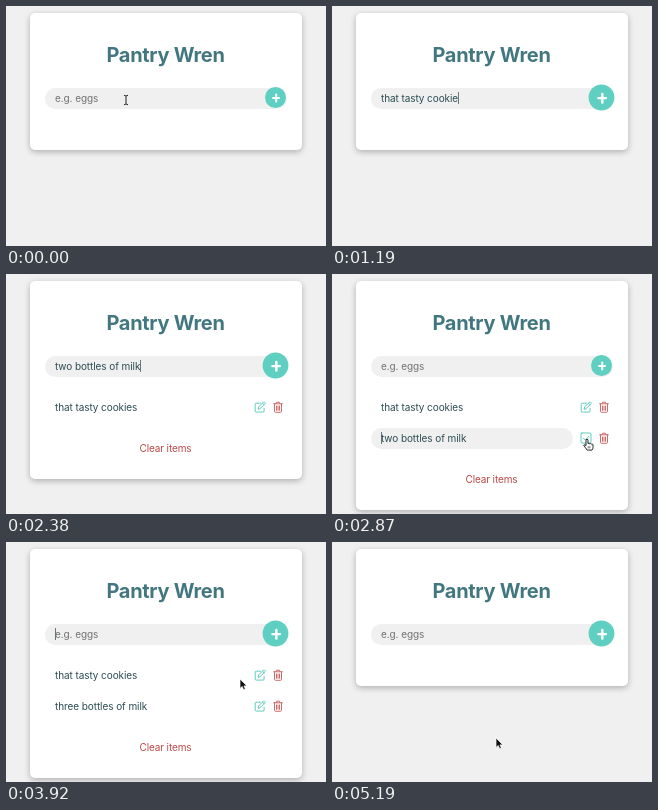
An HTML page for the animation above (5260 ms loop, 320 by 240 pixels).

```html
<!DOCTYPE html>
<html lang="en">
<head>
<meta charset="utf-8">
<title>Shopping list</title>
<style>
  html, body { margin: 0; width: 100%; height: 100%; overflow: hidden; background: #f0f0f0; }
  #stage {
    position: relative; width: 320px; height: 240px; overflow: hidden;
    font: 10px/21px Inter, Roboto, sans-serif; letter-spacing: -.13px; color: #2b4c54;
  }
  #stage div, #stage svg { position: absolute; }
  .card {
    left: 23.6px; top: 6.6px; width: 272px; border-radius: 5px; background: #fff;
    box-shadow: 0 2px 6px rgba(0, 0, 0, .27);
  }
  .title {
    left: 0; top: 36px; width: 319px; text-align: center; color: #437780;
    font-size: 20px; font-weight: 700; line-height: 26px; letter-spacing: -.3px;
  }
  .line {
    left: 39px; height: 21px; padding-left: 10px; box-sizing: border-box;
    border-radius: 11px; white-space: pre; letter-spacing: -.08px;
  }
  .field { top: 81.5px; width: 242px; background: #f0f0f0; }
  .row { width: 202px; }
  .row.open { background: #f0f0f0; }
  .hint { color: #717171; }
  .caret { display: inline-block; width: 1px; height: 12px; margin-right: -1px; vertical-align: -2.5px; background: #66787c; }
  .add { left: 259.4px; top: 81.4px; width: 21px; height: 21px; border-radius: 50%; background: #5ecfc0; }
  .add::before, .add::after {
    content: ""; position: absolute; left: 6.2px; top: 9.6px;
    width: 8.6px; height: 1.8px; border-radius: 1px; background: #fff;
  }
  .add::after { transform: rotate(90deg); }
  .icon { width: 12px; height: 12px; fill: none; stroke-width: .9; stroke-linecap: round; stroke-linejoin: round; }
  .edit, .check { left: 247.8px; stroke: #4fc8b9; }
  .trash { left: 265.8px; stroke: #c85d5b; }
  .trash.big { transform: scale(1.25); }
  .clear { left: 0; width: 319px; text-align: center; color: #bd4747; }
  .pointer { width: 14px; height: 16px; overflow: visible; }
</style>
</head>
<body>
<svg width="0" height="0" style="position:absolute">
  <symbol id="edit" viewBox="0 0 12 12">
    <path d="M6.5 2.2H2.2a1 1 0 0 0-1 1v6.900a1 1 0 0 0 1 1h6.900a1 1 0 0 0 1-1V7.300M4.200 8l.4-2 4.900-4.900q.5-.4 1 0l.6.6q.4.5 0 1L6.200 7.600zM8.500 2.200l1.600 1.600"/>
  </symbol>
  <symbol id="check" viewBox="0 0 12 12">
    <rect x="1" y="1" width="10" height="10" rx="1"/><path d="M3.300 6.100l2 2 3.600-3.900"/>
  </symbol>
  <symbol id="trash" viewBox="0 0 12 12">
    <path d="M1.600 2.800h8.800M4 2.600l.7-1.400h2.600L8 2.600M2.500 3v7.300a1 1 0 0 0 1 1h5a1 1 0 0 0 1-1V3M4.500 5v4.300M6 5v4.300M7.500 5v4.300"/>
  </symbol>
  <symbol id="arrow" viewBox="0 0 14 16" overflow="visible">
    <path d="M0 0v9.500l2.200-2 1.500 3.300 1.700-.8L4 6.900h2.900z" fill="#111" stroke="#fff" stroke-width=".7"/>
  </symbol>
  <symbol id="hand" viewBox="0 0 14 16" overflow="visible">
    <path d="M-1 .7q1-1.200 2 0v3.900q1-.8 1.700.2 1-.7 1.700.3 1.300-.5 1.600.8v2.500q0 1.500-1 2.700H.1Q-1.200 9-3.200 6.700q0-1.300 1.300-.8l.9.8z" fill="#fff" stroke="#111" stroke-width=".9"/>
    <path d="M1.200 7.200v2.200M2.800 7.200v2.200" stroke="#111" stroke-width=".6"/>
  </symbol>
  <symbol id="beam" viewBox="0 0 14 16" overflow="visible">
    <path d="M-2-4.700q2 0 2 1.200 0-1.200 2-1.200M0-3.500v7M-2 4.700q2 0 2-1.200 0 1.200 2 1.200" fill="none" stroke="#222"/>
  </symbol>
</svg>
<div id="stage">
  <div class="card"></div>
  <div class="title">Pantry Wren</div>
  <div class="line field"></div>
  <div class="add"></div>
  <div class="list"></div>
  <svg class="pointer"><use/></svg>
</div>
<script>
const LOOP = 5260, STEP = 70, ROW = 30.5;
const find = s => document.querySelector(s);
const card = find('.card'), field = find('.field'), add = find('.add'),
      list = find('.list'), pointer = find('.pointer'), shape = find('use');

const cookies = 'that tasty cookies', two = 'two bottles of milk',
      three = 'three bottles of milk', eggs = '10 eggs';

// Each entry changes part of the state at its time.
const changes = [
  [0, { items: [], text: '', caret: false, pop: 1, open: -1, at: 0, big: false }],
  [140, { caret: true, pop: 1.1 }],
  [210, { pop: 1.23 }],
  ...typing(cookies, [[280, 1], [420, 3], [490, 5], [630, 8], [770, 9], [840, 10],
    [910, 11], [980, 12], [1050, 14], [1120, 15], [1190, 17]]),
  [1260, { items: [cookies], text: '' }],
  ...typing(two, [[1400, 1], [1470, 2], [1540, 3], [1610, 5], [1680, 6], [1750, 8],
    [1820, 10], [1890, 12], [2100, 14], [2170, 16], [2240, 18], [2380, 19]]),
  [2520, { items: [cookies, two], text: '' }],
  [2800, { open: 1, caret: false, pop: 1.1 }],
  [2870, { pop: 1 }],
  [3080, { at: 3 }],
  ...[[3150, 'tw'], [3220, 't'], [3290, 'th'], [3360, 'thr'], [3500, 'thre'], [3570, 'three']]
    .map(([t, word]) => [t, { items: [cookies, word + two.slice(3)], at: word.length }]),
  [3710, { open: -1, caret: true, pop: 1.1 }],
  [3780, { pop: 1.23 }],
  ...typing(eggs, [[4060, 2], [4130, 4], [4200, 7]]),
  [4270, { items: [cookies, three, eggs], text: '' }],
  [4480, { big: true }],
  [4550, { items: [three, eggs] }],
  [4690, { big: false }],
  [5040, { items: [] }],
  [5180, { caret: false }]
];

// Time, pointer shape, x, y; an empty shape hides it.
const path = [
  [0, 'beam', 120, 94], [280, ''],
  [2590, 'arrow', 150, 104], [2730, 'hand', 253, 163], [2800, 'hand', 255, 165], [3010, ''],
  [3780, 'arrow', 252, 162], [3920, 'arrow', 233.7, 136.6], [3990, 'arrow', 230, 131], [4060, ''],
  [4410, 'arrow', 256, 133], [4480, 'hand', 272, 134], [4550, ''],
  [4620, 'hand', 271, 137], [4690, 'arrow', 244, 158], [4830, 'hand', 166, 198],
  [4900, 'hand', 164.3, 195.8], [5040, 'arrow', 164.3, 195.8]
];

function typing(text, marks) {
  return marks.map(([t, n]) => [t, { text: text.slice(0, n) }]);
}

function withCaret(text, at) {
  return text.slice(0, at) + '<i class="caret"></i>' + text.slice(at);
}

function icon(name, y, extra = '') {
  return `<svg class="icon ${name} ${extra}" style="top:${y}px"><use href="#${name}"/></svg>`;
}

function row(text, i, s) {
  const open = i === s.open, y = 123.2 + i * ROW;
  return `<div class="line row ${open ? 'open' : ''}" style="top:${y}px">${open ? withCaret(text, s.at) : text}</div>` +
    icon(open ? 'check' : 'edit', y + 3.9) +
    icon('trash', y + 3.9, s.big && i === 0 ? 'big' : '');
}

function drawPointer(t) {
  const i = path.findLastIndex(p => p[0] <= t);
  const [t0, kind, x, y] = path[i], next = path[i + 1];
  pointer.style.display = kind ? '' : 'none';
  if (!kind) return;
  const k = next && next[1] ? (t - t0) / (next[0] - t0) : 0;
  pointer.style.left = x + (k && (next[2] - x) * k) + 'px';
  pointer.style.top = y + (k && (next[3] - y) * k) + 'px';
  shape.setAttribute('href', '#' + kind);
}

function draw(t) {
  const s = Object.assign({}, ...changes.filter(c => c[0] <= t).map(c => c[1]));
  const n = s.items.length;
  card.style.height = (n ? 168 + n * ROW : 137) + 'px';
  const text = s.text || 'e.g. eggs';
  field.innerHTML = `<span class="${s.text ? '' : 'hint'}">${s.caret ? withCaret(text, s.text.length) : text}</span>`;
  add.style.transform = `scale(${s.pop})`;
  list.innerHTML = s.items.map((item, i) => row(item, i, s)).join('') +
    (n ? `<div class="clear" style="top:${133.5 + n * ROW}px">Clear items</div>` : '');
  drawPointer(t);
}

const start = performance.now();
let shown = -1;
function tick() {
  const t = Math.floor((performance.now() - start) % LOOP / STEP) * STEP;
  if (t !== shown) draw(shown = t);
  requestAnimationFrame(tick);
}
tick();
</script>
</body>
</html>
```
